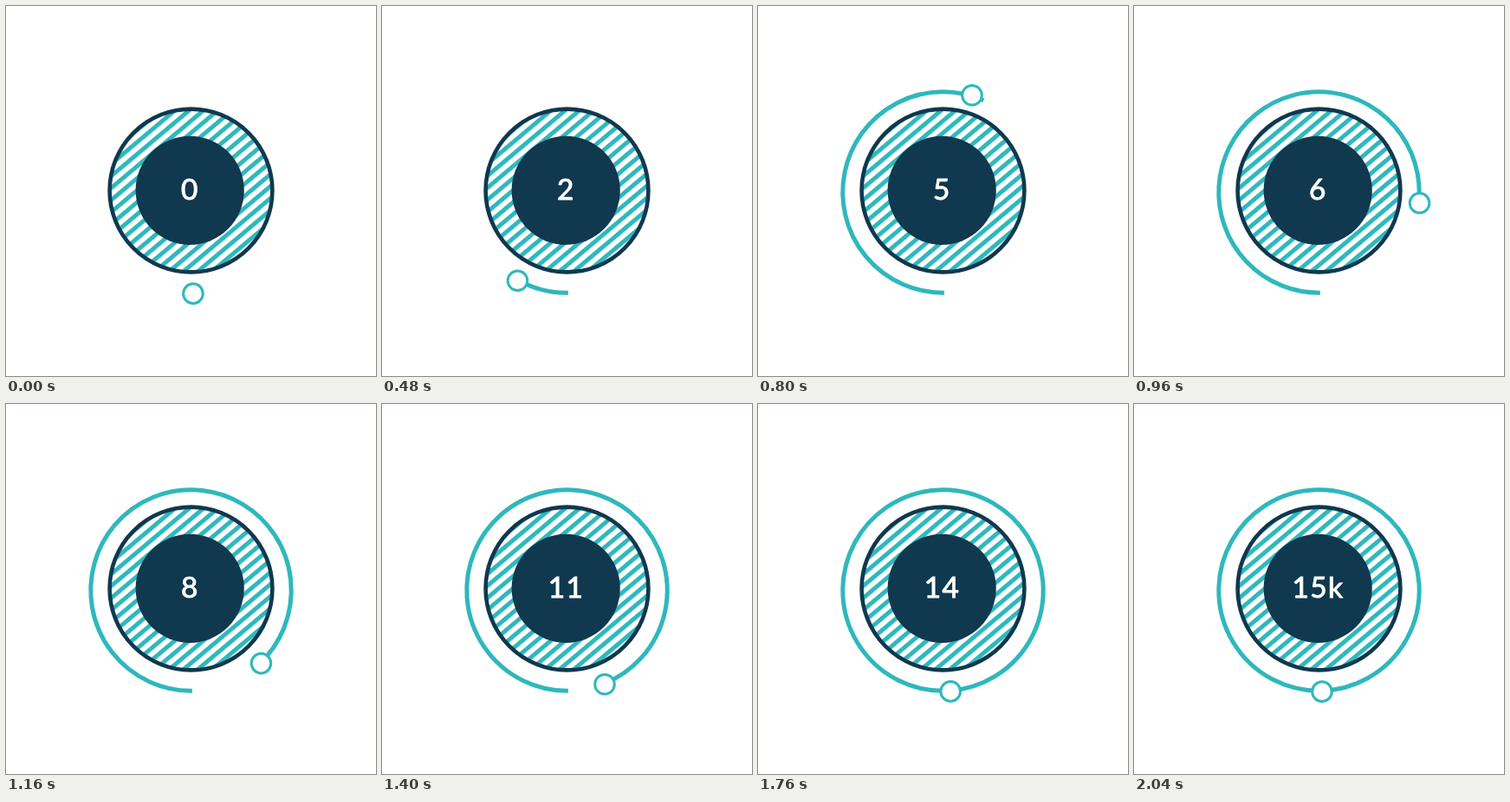
Recreate the animation shown at these times as an HTML page. Size 427x426 px, loop 2560 ms.

```html
<!DOCTYPE html>
<html lang="en">
<head>
<meta charset="utf-8">
<title>Counter dial</title>
<style>
  html, body { margin: 0; width: 100%; height: 100%; overflow: hidden; background: #fff; }
  svg { display: block; width: 100%; height: 100%; }
  text {
    font: 400 33.4px Lato, sans-serif; letter-spacing: 1.5px; text-anchor: middle;
    fill: #fff; stroke: #fff; stroke-width: 1;
  }
</style>
</head>
<body>
<svg viewBox="0 0 427 426">
  <defs>
    <pattern id="stripes" width="40" height="10.6" patternUnits="userSpaceOnUse"
             patternTransform="translate(253.9 261.2) rotate(-40)">
      <rect width="40" height="5" fill="#2eb8bd"/>
    </pattern>
  </defs>
  <circle cx="213.5" cy="212.5" r="93.9" fill="url(#stripes)" stroke="#10384f" stroke-width="4.6"/>
  <circle cx="212.2" cy="212.3" r="62.6" fill="#10384f"/>
  <text id="count" x="212.5" y="222.7">0</text>
  <path id="arc" fill="none" stroke="#2eb8bd" stroke-width="5"/>
  <circle id="knob" r="11.3" fill="#fff" stroke="#2eb8bd" stroke-width="3"/>
</svg>
<script>
  const LOOP = 2560, STEP = 40, START = 280, END = 1880, TOTAL = 15;
  const RADIUS = 115.7, KNOB_RADIUS = 116.7;
  const ARC_START = -0.7, KNOB_START = -1.2;
  const [arc, knob, count] = ['arc', 'knob', 'count'].map(id => document.getElementById(id));

  const progress = (t, start, duration) => Math.min(1, Math.max(0, (t - start) / duration));
  const easeInOut = u => u * u * u * (10 + u * (6 * u - 15));
  const easeOut = u => 1 - (1 - u) ** 2;

  // Degrees travelled: a fast main swing, then a slow glide to the bottom.
  const sweep = (t, swing) =>
    318.3 * easeInOut(progress(t, 240, swing)) + 41.2 * easeOut(progress(t, 1160, 800));

  // Angles run clockwise from the bottom.
  function point(degrees, radius) {
    const a = degrees * Math.PI / 180;
    return [213.5 - radius * Math.sin(a), 214.5 + radius * Math.cos(a)];
  }

  function draw(t) {
    const swept = sweep(t, 970);
    const large = swept > 180 ? 1 : 0;
    arc.setAttribute('d', `M${point(ARC_START, RADIUS)}` +
      `A${RADIUS} ${RADIUS} 0 ${large} 1 ${point(ARC_START + swept, RADIUS)}`);

    const [x, y] = point(KNOB_START + sweep(t, 990), KNOB_RADIUS);
    knob.setAttribute('cx', x);
    knob.setAttribute('cy', y);

    const n = Math.round(TOTAL * progress(t, START, END - START));
    count.textContent = n === TOTAL ? n + 'k' : n;
  }

  const origin = performance.now();
  function tick() {
    const t = (performance.now() - origin) % LOOP;
    draw(Math.floor(t / STEP) * STEP);
    requestAnimationFrame(tick);
  }
  tick();
</script>
</body>
</html>
```
